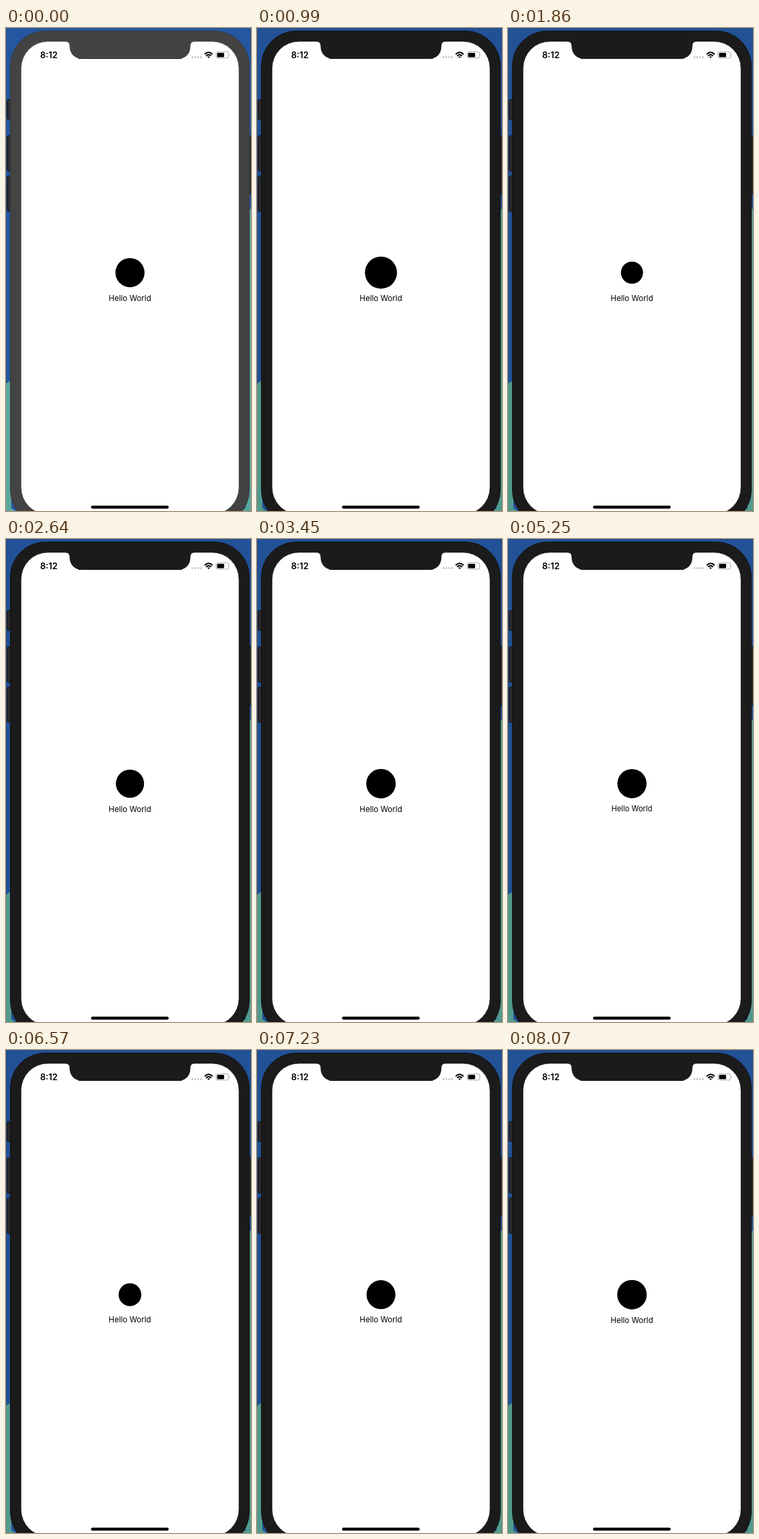
These frames come from a looping animation (366x720 px, 8100 ms). An HTML page:

```html
<!DOCTYPE html>
<html lang="en">
<head>
<meta charset="utf-8">
<title>Hello World</title>
<style>
  html, body { margin: 0; width: 100%; height: 100%; overflow: hidden; }
  svg { display: block; width: 100vw; height: 100vh; font-family: Inter, "Open Sans", sans-serif;
        --bezel: #434343; --rim: #383a3e; --blue: #2457a0; --teal: #5ba79f; --key: #2b2d33; }
  svg.focused { --bezel: #1b1b1b; --rim: #111; --blue: #225196; --teal: #529a8e; --key: #292a2c; }
  .bezel { fill: var(--bezel); }
  .keys rect { fill: var(--key); stroke: #15181f; }
</style>
</head>
<body>
<svg id="stage" viewBox="0 0 366 720">
  <rect width="366" height="720" fill="var(--blue)"/>
  <path d="M0 530L8 525V720H0ZM358 274L366 269V720H358Z" fill="var(--teal)"/>
  <path d="M0 720V712Q7 714 14 720ZM366 720V712Q359 714 352 720Z" fill="var(--teal)"/>
  <g class="keys">
    <rect x="1.5" y="106.500" width="8" height="30" rx="2"/>
    <rect x="1.5" y="160.500" width="8" height="53" rx="2"/>
    <rect x="1.5" y="220.500" width="8" height="53" rx="2"/>
    <rect x="358.500" y="160.500" width="9" height="87" rx="2"/>
  </g>
  <rect class="bezel" x="6.500" y="4.500" width="357" height="736" rx="52" stroke="var(--rim)"/>
  <rect x="22.500" y="20" width="325.500" height="705" rx="40" fill="#fff" stroke="var(--rim)" stroke-width=".6"/>
  <path class="bezel" d="M88 19V20Q95 20 95 27C95 39 103 46 115 46H256C268 46 275.500 39 275.500 27Q275.500 20 282 20V19Z"/>
  <path d="M108 45.500H263" stroke="#111" stroke-width=".8"/>

  <text x="51" y="44.700" font-size="13" font-weight="600">8:12</text>
  <path d="M278.500 43.500h14" stroke="#c2c2c2" stroke-width="2.800" stroke-linecap="round" stroke-dasharray="0 4.300"/>
  <g fill="none" stroke="#000" stroke-width="2">
    <path d="M296.800 39.200Q302.700 33.300 308.600 39.200M299 41.700Q302.700 38 306.400 41.700"/>
    <path d="M300.800 43L302.700 45L304.600 43Q302.700 41.300 300.800 43Z" fill="#000" stroke="none"/>
  </g>
  <rect x="313.800" y="35.500" width="18.800" height="9.400" rx="2.600" fill="none" stroke="#aaa"/>
  <rect x="315.400" y="37" width="10.400" height="6.400" rx="1.200"/>
  <path d="M333.800 38.700q1.400 1.500 0 3Z" fill="#999"/>
  <rect x="127" y="712" width="116" height="4.600" rx="2.300"/>

  <circle id="dot" cx="185.200" cy="364.700" r="21.750"/>
  <g id="label"><text y="12" font-size="11.600" text-anchor="middle">Hello World</text></g>
</svg>
<script>
  const LOOP = 8100, FOCUS_AT = 750, PRESS_MS = 350, DOT_RADIUS = 21.75;
  const stage = document.getElementById('stage');
  const dot = document.getElementById('dot');
  const label = document.getElementById('label');

  const dotMotion = {
    gain: 0.43, response: 0.9, damping: 0.18,
    taps: [{ down: 880, up: 1420 }, { down: 5410, up: 6050 }]
  };
  const labelMotion = {
    gain: 0.365, response: 0.6, damping: 0.23,
    taps: [{ down: 3550, up: 4350 }]
  };

  // Remaining share of the displacement after the release
  function spring(ms, response, damping) {
    const omega = 2 * Math.PI / response, s = ms / 1000;
    const root = Math.sqrt(1 - damping * damping), angle = omega * root * s;
    return Math.exp(-damping * omega * s) * (Math.cos(angle) + damping / root * Math.sin(angle));
  }

  const easeInOut = p => p * p * (3 - 2 * p);

  function scaleAt(t, { gain, response, damping, taps }) {
    const tap = taps.filter(({ down }) => t >= down).pop();
    if (!tap) return 1;
    const amount = t < tap.up
      ? easeInOut(Math.min(1, (t - tap.down) / PRESS_MS))
      : spring(t - tap.up, response, damping);
    return 1 + gain * amount;
  }

  function draw(now) {
    const t = now % LOOP;
    stage.classList.toggle('focused', t >= FOCUS_AT);
    dot.setAttribute('r', DOT_RADIUS * scaleAt(t, dotMotion));
    label.setAttribute('transform', `translate(185 394.500) scale(${scaleAt(t, labelMotion)})`);
  }

  const start = performance.now();
  function tick() {
    draw(performance.now() - start);
    requestAnimationFrame(tick);
  }
  tick();
</script>
</body>
</html>
```
